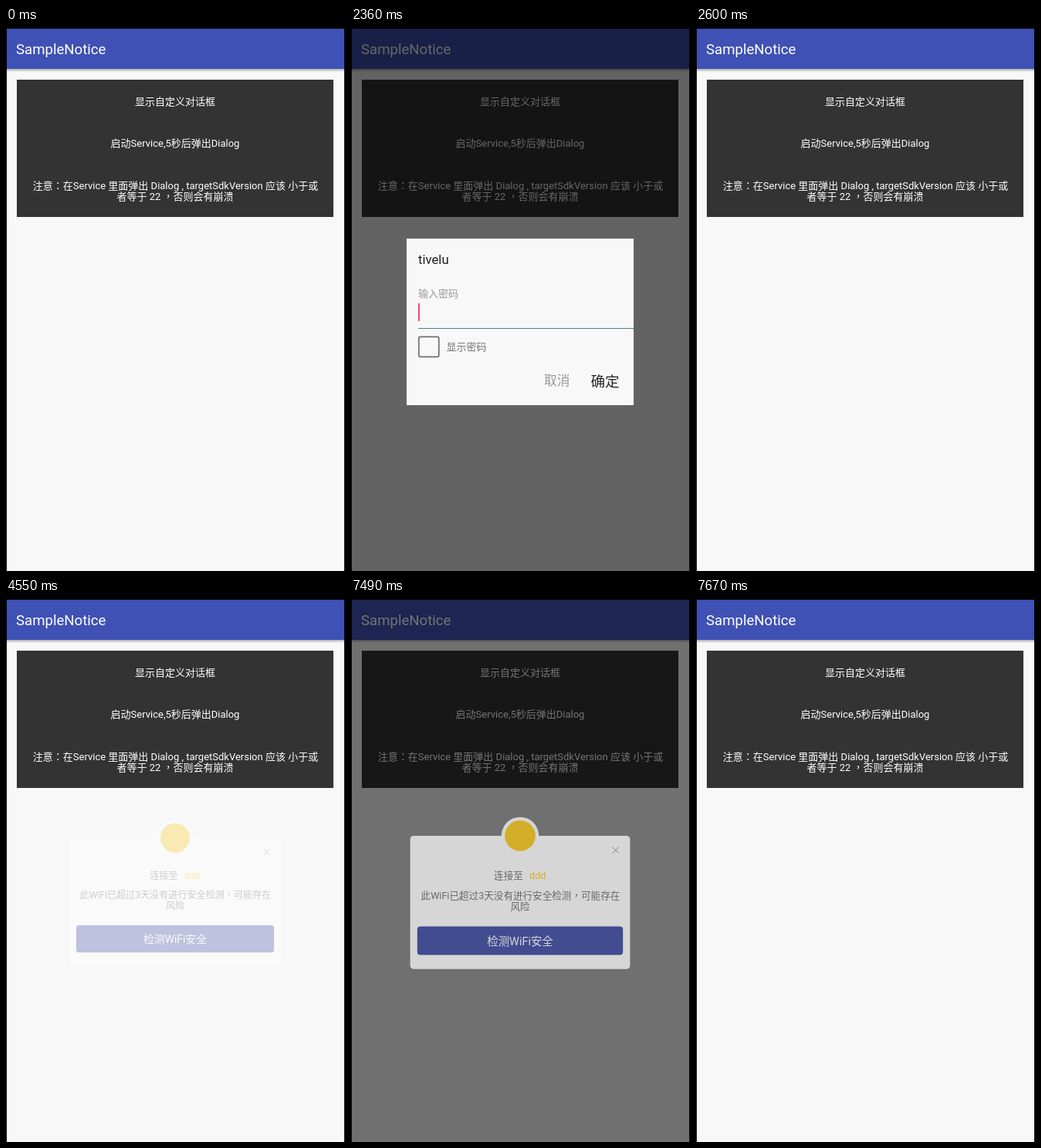
Write an HTML page that moves like this. It is 439 by 704 pixels and loops after 8000 ms.

```html
<!DOCTYPE html>
<html lang="zh-Hans">
<head>
<meta charset="utf-8">
<title>Dialog demo</title>
<style>
  html, body { margin: 0; width: 100%; height: 100%; overflow: hidden; background: #000; }
  svg { display: block; width: 439px; height: 704px; }
  text { font: 13px Roboto, "Noto Sans CJK SC", "Noto Sans CJK", sans-serif; white-space: pre; }
  .mid { text-anchor: middle; }
  /* full-width punctuation centred in its cell */
  .punct { font-family: "Noto Sans CJK TC", "Noto Sans CJK", sans-serif; }
  .dialog { transform-origin: 219px 381.5px; opacity: 0; }
</style>
</head>
<body>
<svg viewBox="0 0 439 704" xmlns="http://www.w3.org/2000/svg">
  <defs>
    <linearGradient id="shade" x2="0" y2="1">
      <stop offset="0" stop-opacity=".3"/>
      <stop offset="1" stop-opacity="0"/>
    </linearGradient>
  </defs>

  <rect width="439" height="704"/>
  <rect x="1" y="1" width="437" height="703" fill="#f8f8f8"/>
  <rect x="1" y="53" width="437" height="4" fill="url(#shade)"/>
  <rect x="1" y="1" width="437" height="52" fill="#3f51b5"/>
  <rect x="14" y="67" width="410" height="178" fill="#333"/>
  <g fill="#fff">
    <text x="13" y="34" style="font-size:18.6px">SampleNotice</text>
    <g class="mid">
      <text x="219" y="100">显示自定义对话框</text>
      <text x="219" y="154">启动Service,5秒后弹出Dialog</text>
      <text x="219.5" y="208.5">注意<tspan class="punct" lang="zh-Hant">：</tspan>在Service 里面弹出 Dialog , targetSdkVersion 应该 小于或</text>
      <text x="219" y="223">者等于 22 <tspan class="punct" lang="zh-Hant">，</tspan>否则会有崩溃</text>
    </g>
  </g>

  <rect id="dim" x="1" y="1" width="437" height="703" opacity="0"/>

  <g id="password" class="dialog">
    <rect x="72" y="273" width="294" height="216" fill="#f8f8f8"/>
    <text x="87" y="306" fill="#212121" style="font-size:16.7px">tivelu</text>
    <text x="87" y="348.5" fill="#999">输入密码</text>
    <rect id="caret" x="87" y="357" width="2" height="23" fill="#ff4081"/>
    <rect x="87" y="389" width="279" height="1" fill="#4f7ba0"/>
    <rect x="87.8" y="400.3" width="26" height="26" rx="2" fill="none" stroke="#707070" stroke-width="1.7"/>
    <text x="123.5" y="418" fill="#757575">显示密码</text>
    <text x="250" y="463" fill="#999" style="font-size:16.7px">取消</text>
    <text x="310.5" y="465" fill="#262626" style="font-size:18.6px">确定</text>
  </g>

  <g id="wifi" class="dialog">
    <rect x="72" y="304.5" width="294" height="178.5" rx="5" fill="#fff"/>
    <circle cx="219" cy="304.5" r="25" fill="#fff"/>
    <circle cx="219" cy="304.5" r="20.5" fill="#fdc70c"/>
    <path d="M342.5 319.5l8.5 8.5m0-8.5l-8.5 8.5" stroke="#888" stroke-width="1"/>
    <text x="184" y="362" fill="#666">连接至</text>
    <text x="231.5" y="362" fill="#fdc70c">ddd</text>
    <g class="mid" fill="#666">
      <text x="219.5" y="389">此WiFi已超过3天没有进行安全检测<tspan class="punct" lang="zh-Hant">，</tspan>可能存在</text>
      <text x="219" y="403.5">风险</text>
    </g>
    <rect x="81.5" y="426" width="275" height="38" rx="4" fill="#303f9f"/>
    <text class="mid" x="219" y="451" fill="#fff" style="font-size:14.9px">检测WiFi安全</text>
  </g>
</svg>
<script>
  const LOOP = 8000, TICK = 30, LEAD = 16;
  const byId = id => document.getElementById(id);
  const dim = byId('dim'), caret = byId('caret');
  const dialogs = [
    { el: byId('password'), open: 500, close: 2420 },
    { el: byId('wifi'), open: 4550, close: 7490 }
  ];

  const clamp = v => Math.min(1, Math.max(0, v));
  const decelerate = (v, power) => 1 - (1 - clamp(v)) ** power;
  // time since an event, held for one tick at a time
  const elapsed = (t, from) => LEAD + TICK * Math.floor((t - from) / TICK);

  function pose(t, { open, close }) {
    if (t < open || t >= close + 6 * TICK) return { alpha: 0, scale: 1, shade: 0 };
    const closing = t >= close;
    const e = elapsed(t, closing ? close : open);
    const fade = decelerate(e / 150, 3);
    const zoom = decelerate(e / 220, 5);
    return closing
      ? { alpha: 1 - fade, scale: 1 - 0.1 * zoom, shade: 1 - clamp(e / 180) }
      : { alpha: fade, scale: 0.9 + 0.1 * zoom, shade: clamp((e - LEAD) / 210) };
  }

  function draw(t) {
    let shade = 0;
    for (const d of dialogs) {
      const p = pose(t, d);
      d.el.style.opacity = p.alpha;
      d.el.style.transform = p.scale > 0.9999 ? 'none' : `scale(${p.scale})`;
      shade += p.shade;
    }
    dim.setAttribute('opacity', 0.6 * shade);
    // the caret toggles every 480 ms
    caret.setAttribute('opacity', Math.floor((t - 440) / 480) % 2 ? 0 : 1);
  }

  const start = performance.now();
  function tick() {
    draw((performance.now() - start) % LOOP);
    requestAnimationFrame(tick);
  }
  tick();
</script>
</body>
</html>
```
